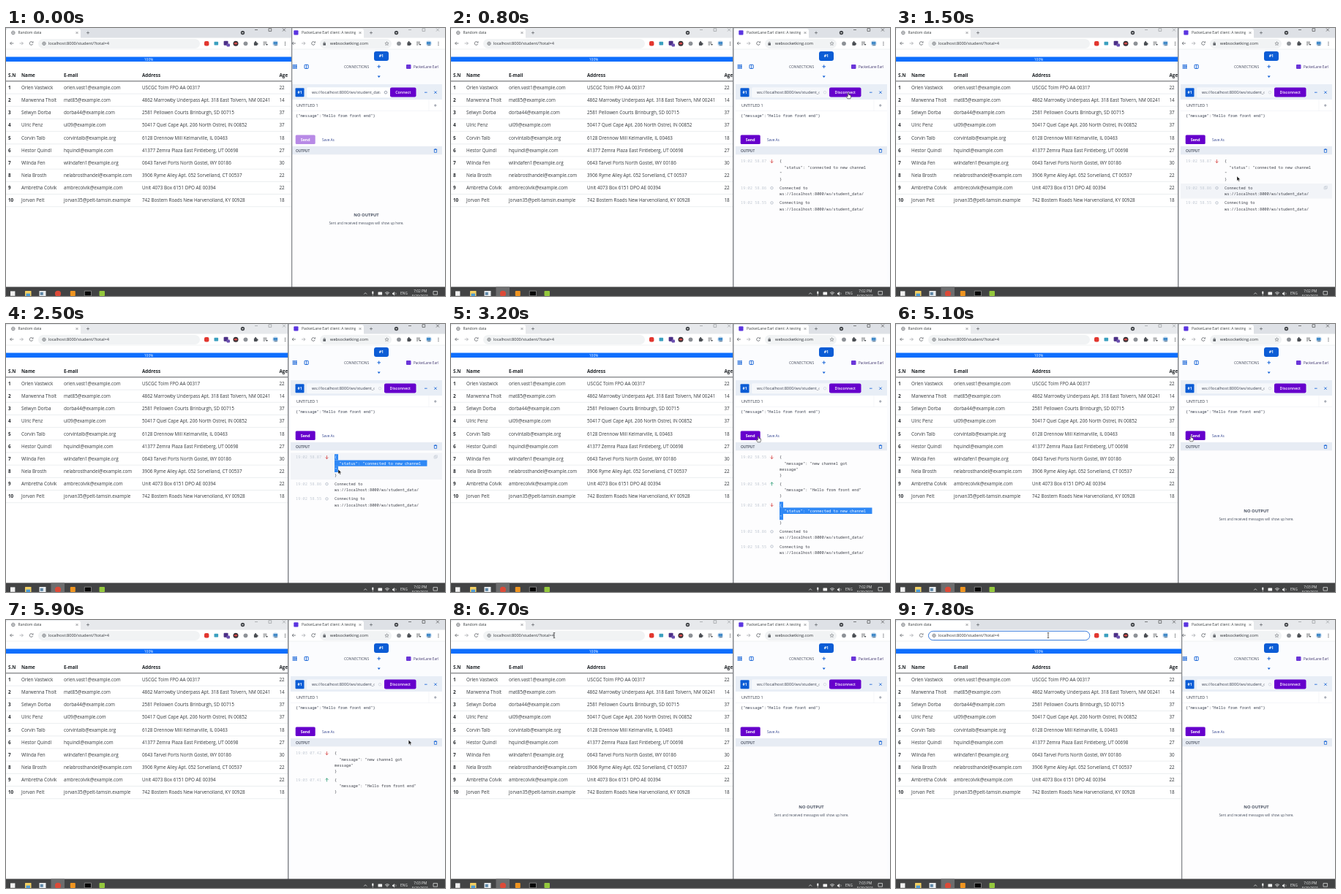
Recreate the animation shown at these times as an HTML page with a canvas. Size 600 by 367 pixels, loop 8 s.

```html
<!DOCTYPE html>
<html lang="en">
<head>
<meta charset="utf-8">
<title>Random data</title>
<style>
html, body { margin: 0; width: 100%; height: 100%; overflow: hidden; background: #fff; }
canvas { display: block; width: 600px; height: 367px; }
</style>
</head>
<body>
<canvas id="stage"></canvas>
<script>
const W = 600, H = 367, LOOP = 8000, STEP = 100;
const canvas = document.getElementById('stage');
const ratio = window.devicePixelRatio || 1;
canvas.width = W * ratio;
canvas.height = H * ratio;
const c = canvas.getContext('2d');
c.scale(ratio, ratio);

const SANS = '"Open Sans", sans-serif';
const MONO = '"Noto Sans Mono", monospace';
const BLUE = '#0b5cd5', PURPLE = '#6600cc', INK = '#212529', GREY = '#5f6368';

// name | e-mail | address | age
const people = `Orlen Vastwick|orlen.vast1@example.com|USCGC Tolm FPO AA 00317|22
Marwenna Tholt|mat85@example.com|4862 Marrowby Underpass Apt. 318 East Tolvern, NM 00241|14
Selwyn Dorba|dorba44@example.com|2581 Pellowen Courts Brinburgh, SD 00715|37
Ulric Penz|ul09@example.com|50417 Quel Cape Apt. 206 North Ostrel, IN 00852|37
Corvin Talb|corvintalb@example.org|6128 Drennow Mill Kelmarville, IL 00463|18
Hestor Quindl|hquindl@example.com|41377 Zemra Plaza East Fintleberg, UT 00698|27
Wilnda Fen|wilndafen1@example.org|0643 Tarvel Ports North Gostel, WY 00186|30
Nela Brosth|nelabrosthandel@example.com|3906 Ryme Alley Apt. 052 Sorvelland, CT 00537|22
Ambretha Colvik|ambrecolvik@example.com|Unit 4073 Box 6151 DPO AE 00394|22
Jorvan Pelt|jorvan35@pelt-tamsin.example|742 Bostem Roads New Harvenolland, KY 00928|18`
  .split('\n').map(row => row.split('|'));

// Moments of the story, in ms
const FOCUS_RIGHT = 300, CONNECT = 500, CLEAR = [4200, 6200], SENDS = [3200, 3400, 3600, 5400];
const MINUTE = 5000, FOCUS_LEFT = 7000;
const sentTimes = [['58.54', '58.55'], ['58.08', '58.09'], ['59.02', '59.03'], ['07.41', '07.42']];

// time, x, y of the pointer tip
const path = [
  [100, 520, 140], [300, 543, 89], [1000, 543, 89], [1300, 490, 228], [1500, 466, 203],
  [1900, 450, 181], [2500, 454, 199], [2700, 470, 200], [3000, 420, 154], [3600, 420, 154],
  [4000, 587, 167], [4300, 587, 167], [5100, 403, 153], [5500, 403, 153], [6000, 587, 167],
  [6200, 587, 167], [6700, 141, 21], [7200, 141, 21], [7500, 257, 21], [7799, 257, 21], [7800, 208, 21]
];

function pointer(t) {
  const i = path.findIndex(p => p[0] > t);
  if (i < 0) return path[path.length - 1].slice(1);
  if (i === 0) return path[0].slice(1);
  const [t0, x0, y0] = path[i - 1], [t1, x1, y1] = path[i];
  const k = (t - t0) / (t1 - t0);
  return [x0 + (x1 - x0) * k, y0 + (y1 - y0) * k];
}

function box(x, y, w, h, fill, r = 0) {
  c.fillStyle = fill;
  c.beginPath();
  c.roundRect(x, y, w, h, r);
  c.fill();
}

function frame(x, y, w, h, color, lw = 0.6, r = 0) {
  c.strokeStyle = color;
  c.lineWidth = lw;
  c.beginPath();
  c.roundRect(x, y, w, h, r);
  c.stroke();
}

function disc(x, y, r, fill) {
  c.fillStyle = fill;
  c.beginPath();
  c.arc(x, y, r, 0, 7);
  c.fill();
}

function ring(x, y, r, color, lw = 0.6, from = 0, to = 2 * Math.PI) {
  c.strokeStyle = color;
  c.lineWidth = lw;
  c.beginPath();
  c.arc(x, y, r, from, to);
  c.stroke();
}

function trace(pts) {
  c.beginPath();
  for (let i = 0; i < pts.length; i += 2) c.lineTo(pts[i], pts[i + 1]);
}

function line(color, lw, ...pts) {
  c.strokeStyle = color;
  c.lineWidth = lw;
  trace(pts);
  c.stroke();
}

function poly(fill, ...pts) {
  c.fillStyle = fill;
  trace(pts);
  c.fill();
}

// y is the middle of the capital letters
function text(s, x, y, size, color = INK, { bold = 400, align = 'left', font = SANS } = {}) {
  c.font = `${bold} ${size}px ${font}`;
  c.textAlign = align;
  c.fillStyle = color;
  c.fillText(s, x, y + size * 0.36);
}

function clipped(x, y, w, h, draw) {
  c.save();
  c.beginPath();
  c.rect(x, y, w, h);
  c.clip();
  draw();
  c.restore();
}

function cross(x, y, r, color, lw = 0.6) {
  line(color, lw, x - r, y - r, x + r, y + r);
  line(color, lw, x + r, y - r, x - r, y + r);
}

function plus(x, y, r, color, lw = 0.7) {
  line(color, lw, x - r, y, x + r, y);
  line(color, lw, x, y - r, x, y + r);
}

function arrow(x, y, dx, dy, r, color, lw = 0.8) {
  line(color, lw, x - dx * r, y - dy * r, x + dx * r, y + dy * r);
  const tx = x + dx * r, ty = y + dy * r, h = r * 0.9;
  line(color, lw, tx - dx * h + dy * h, ty - dy * h + dx * h, tx, ty,
    tx - dx * h - dy * h, ty - dy * h - dx * h);
}

function globe(x, y, r, color) {
  ring(x, y, r, color, 0.7);
  line(color, 0.5, x - r, y, x + r, y);
  line(color, 0.5, x, y - r, x, y + r);
}

function chromeFrame(x, w, tabEnd, title, active) {
  const shade = active ? '#333' : '#8a8d91', end = x + w;
  box(x, 0, w, 14, active ? '#dee1e6' : '#e7e9ec');
  box(x, 1, tabEnd - x, 13, '#fff', [3, 3, 0, 0]);
  clipped(x, 0, tabEnd - x - 11, 14, () => text(title, x + (x ? 18.5 : 16.5), 6.6, 5.1, '#3c4043'));
  cross(tabEnd - 5, 6.5, 1.5, GREY);
  plus(tabEnd + 10, 6.5, 2, GREY);
  disc(end - 66.5, 6.5, 2.7, '#45484c');
  poly('#fff', end - 67.8, 5.9, end - 65.2, 5.9, end - 66.5, 7.6);
  line(shade, 0.6, end - 50, 2.5, end - 46, 2.5);
  frame(end - 31, 0.7, 3.7, 3.7, shade);
  cross(end - 10, 2.5, 2, shade);
  box(x, 13.5, w, 15.5, '#fff');
  line('#e2e4e7', 0.5, x, 29, end, 29);
}

function navButtons(x) {
  arrow(x, 21, -1, 0, 2.4, GREY);
  arrow(x + 13, 21, 1, 0, 2.4, '#a5a8ac');
  ring(x + 26.5, 21, 2.3, GREY, 0.8, 0.3, 5.4);
  poly(GREY, x + 27.2, 20.2, x + 29.4, 20.2, x + 29.4, 18);
}

function menuIcons(x) {
  disc(x, 21.3, 2.9, '#8d9196');
  box(x + 11.4, 19.6, 4.6, 4.4, '#4b4f54', 0.8);
  disc(x + 13.6, 19.2, 1.1, '#4b4f54');
  disc(x + 16.2, 21.8, 1, '#4b4f54');
  for (let i = 0; i < 3; i++) line('#44484c', 0.7, x + 24, 19.2 + i * 1.9, x + (i < 2 ? 29 : 26.5), 19.2 + i * 1.9);
  poly('#44484c', x + 27.5, 22, x + 30.5, 22, x + 29, 24);
  disc(x + 40.7, 21.3, 4.2, '#dbe8f5');
  box(x + 38, 18.8, 5.5, 3.8, '#4189c7');
  box(x + 39.2, 23, 4, 1, '#6a7f92');
  for (let i = -1; i < 2; i++) disc(x + 54, 21.3 + i * 2, 0.65, '#44484c');
}

function leftWindow(t, active) {
  box(0, 0, 390, 355, '#fff');
  chromeFrame(0, 390, 102, 'Random data', active);
  globe(9.8, 6.5, 2.3, GREY);
  navButtons(8);
  const typing = t >= FOCUS_LEFT;
  box(44, 15, 221, 13, typing ? '#fff' : '#f1f3f4', 6.5);
  if (typing) frame(44.4, 15.3, 220.4, 12.3, '#3b7ddd', 1, 6.2);
  globe(52, 21.3, 2.2, GREY);
  text('localhost:8000/student/?total=4', 57.8, 21.2, 5.65, '#303338');
  if (typing && t < 7800) line('#222', 0.6, 141.4, 18, 141.4, 24.5);
  box(271, 18, 6.4, 6.6, '#e2372f', 2);
  box(284.5, 18.8, 5.6, 4.8, '#3aa0bf', 0.8);
  box(297.6, 17.8, 6, 6, '#4b2f86', 1);
  box(301.5, 21.4, 4.5, 4, '#6b4fb0', 0.8);
  disc(314, 21.3, 3.5, '#3a3034');
  box(312, 20, 4, 2.4, '#d44b4b');
  menuIcons(327.5);

  box(0, 39.5, 390, 6.6, '#0d6efd');
  text('100%', 195, 42.8, 4.9, '#fff', { align: 'center' });
  const cols = [3, 21, 79, 186, 373.5];
  ['S.N', 'Name', 'E-mail', 'Address', 'Age'].forEach((s, i) => text(s, cols[i], 64.4, 6.3, INK, { bold: 700 }));
  line('#33373b', 0.8, 0, 72.8, 390, 72.8);
  people.forEach((row, i) => {
    const y = 81.6 + i * 17.18;
    text(String(i + 1), cols[0], y, 6.3, INK, { bold: 700 });
    row.forEach((s, k) => text(s, cols[k + 1], y, 6.3, '#33373b'));
    line('#dee2e6', 0.6, 0, y + 8.5, 390, y + 8.5);
  });
}

function entry(kind, time) {
  const hello = ['{', '  "message": "Hello from front end"', '}'];
  const got = ['{', '  "message": "new channel got', 'message"', '}'];
  const status = ['{', '  "status": "connected to new channel', '"', '}'];
  const url = 'ws://localhost:8000/ws/student_data/';
  const lines = { hello, got, status, open: ['Connected to', url], start: ['Connecting to', url] }[kind];
  return { kind, time, lines, h: lines.length * 8.2 + 3.9 };
}

// Newest entry first
function log(t) {
  const since = Math.max(0, ...CLEAR.filter(x => x <= t));
  const list = [];
  if (!since && t >= CONNECT) list.push(entry('start', '19:02 58.55'));
  if (!since && t >= CONNECT + 100) list.unshift(entry('open', '19:02 58.86'));
  if (!since && t >= CONNECT + 200) list.unshift(entry('status', '19:02 58.87'));
  SENDS.forEach((s, i) => {
    if (s > t || s < since) return;
    const minute = s < MINUTE ? '19:02 ' : '19:03 ';
    list.unshift(entry('got', minute + sentTimes[i][1]), entry('hello', minute + sentTimes[i][0]));
  });
  return list;
}

function drawEntry(e, y, t, hover) {
  if (hover) {
    box(389, y, 207, e.h, '#f2f4f8');
    frame(585, y + 4.5, 3.2, 3.2, '#b9c1cd', 0.5);
    frame(586.2, y + 3.4, 3.2, 3.2, '#b9c1cd', 0.5);
  }
  const mid = y + 6, mono = { font: MONO };
  text(e.time, 396, mid, 5.33, '#c3cad4', mono);
  if (e.kind === 'hello') arrow(438.5, mid, 0, -1, 2.3, '#2f9e78');
  else if (e.kind === 'got' || e.kind === 'status') arrow(438.5, mid, 0, 1, 2.3, '#d64545');
  else ring(438.5, mid, 1.7, '#b4bcc8', 0.9);
  const picked = e.kind === 'status' ? Math.max(0, Math.min(3, Math.floor((t - 1800) / 200))) : 0;
  e.lines.forEach((s, i) => {
    const ly = mid + i * 8.2, on = i < picked;
    if (on) box(449, ly - 4.2, i === 1 ? 126.5 : 5, 8.4, '#2f88f5');
    text(s, 449, ly, 5.33, on ? '#fff' : '#3f424b', mono);
  });
}

function output(t) {
  box(389, 173.5, 207, 178, '#fdfdfe');
  const list = log(t);
  if (!list.length) {
    text('NO OUTPUT', 492.5, 256, 5.75, '#4a5262', { bold: 700, align: 'center' });
    text('Sent and received messages will show up here.', 492.5, 267, 4.7, '#4a5262', { align: 'center' });
    return;
  }
  const [px, py] = pointer(t - STEP);
  clipped(389, 173.5, 207, 178, () => {
    let y = 176.4;
    for (const e of list) {
      drawEntry(e, y, t, px > 389 && py >= y && py < y + e.h);
      y += e.h;
    }
    const total = y - 173.5;
    if (total < 178) return;
    box(590, 173.5, 6, 178, '#f1f1f1');
    box(590.5, 180, 5, 165 * 178 / total, '#c1c1c1');
    poly('#606060', 591.5, 178, 594.5, 178, 593, 176);
    poly('#606060', 591.5, 347, 594.5, 347, 593, 349);
  });
}

function trash(x, y) {
  line(BLUE, 0.7, x - 2.2, y - 1.7, x + 2.2, y - 1.7);
  line(BLUE, 0.6, x - 0.8, y - 2.4, x + 0.8, y - 2.4);
  frame(x - 1.6, y - 1.6, 3.2, 4, BLUE, 0.7);
}

function rightWindow(t, active) {
  const live = t >= CONNECT;
  box(385.5, 0, 214.5, 355, '#fbfcfe');
  chromeFrame(385.5, 214.5, 489, 'PacketLane Earl client: A testing tool', active);
  box(393.3, 3.3, 6.2, 6.2, '#5b35e0', 1);
  navButtons(393.5);
  box(429, 15, 98, 13, '#f1f3f4', 6.5);
  box(433.4, 20.6, 3.6, 3.2, GREY, 0.5);
  ring(435.2, 20.4, 1.2, GREY, 0.6, Math.PI, 2 * Math.PI);
  text('websocketking.com', 443, 21.2, 5.7, '#303338');
  const star = [];
  for (let i = 0; i <= 10; i++) {
    const a = i * Math.PI / 5 - Math.PI / 2, r = i % 2 ? 1.2 : 2.7;
    star.push(520.5 + r * Math.cos(a), 21.4 + r * Math.sin(a));
  }
  line(GREY, 0.5, ...star);
  menuIcons(537);

  box(503, 32, 20, 13, BLUE, 3);
  text('#1', 512.9, 38.4, 5.2, '#fff', { bold: 700, align: 'center' });
  for (let i = 0; i < 9; i++) box(391.8 + i % 3 * 2.1, 50 + Math.floor(i / 3) * 2.1, 1.6, 1.6, BLUE);
  frame(408, 50.3, 5.2, 5.2, BLUE, 0.9, 0.6);
  line(BLUE, 0.8, 410.6, 50.3, 410.6, 55.5);
  text('CONNECTIONS', 462, 53, 4.9, '#454c5c');
  plus(509.7, 52.8, 2.3, BLUE, 0.9);
  poly(BLUE, 507.7, 65.5, 511.7, 65.5, 509.7, 68);
  box(547, 50, 6.5, 6, '#6a35d8', 1);
  text('PacketLane Earl', 557, 53, 4.65, '#41366f');

  box(389, 77, 207, 21, '#e8eef6');
  box(395.5, 82.3, 12, 12, BLUE, 1);
  text('#1', 401.5, 88.2, 4.8, '#fff', { bold: 700, align: 'center' });
  const edge = live ? 517 : 525;
  box(411, 81.3, edge - 408, 14, live ? '#f6f8fb' : '#fff', 2);
  clipped(411, 80, edge - 13.5 - 411, 16, () =>
    text('ws://localhost:8000/ws/student_data/', 418, 88.2, 5.62, '#3b4252'));
  ring(edge - 6, 88.2, 1.8, live ? '#d5dae2' : '#8f98a8', 0.9);
  box(edge, 81.6, 560.5 - edge, 13, PURPLE, 2);
  text(live ? 'Disconnect' : 'Connect', (edge + 560.5) / 2, 88.1, 5.3, '#fff', { bold: 600, align: 'center' });
  line(BLUE, 0.8, 572, 88.2, 575.6, 88.2);
  cross(587, 88.2, 1.7, BLUE, 0.8);

  box(389, 98, 207, 64, '#fff');
  text('UNTITLED 1', 397, 106, 5.4, '#2f3644', { bold: 500 });
  plus(586.8, 106, 1.8, '#6d7686', 0.7);
  line('#eaedf3', 0.5, 389, 113.5, 596, 113.5);
  line('#eaedf3', 0.5, 578, 98, 578, 113.5);
  text('{"message":"Hello from front end"}', 396, 119.7, 5.33, '#3b4252', { font: MONO });
  box(395.7, 146.5, 27, 12.4, live ? PURPLE : '#b88ae6', 1.5);
  text('Send', 409.2, 152.7, 5.3, '#fff', { bold: 700, align: 'center' });
  text('Save As', 432, 153, 4.75, '#31438f');

  box(389, 162, 207, 11.5, '#e7ecf4');
  text('OUTPUT', 396, 168, 4.75, '#3b4252', { bold: 600 });
  trash(587, 168);
  output(t);
}

function taskbar(t) {
  box(0, 354.5, W, 12.5, '#424344');
  if (t >= 100) box(61.5, 354.5, 18.5, 12.5, '#6c6d6e');
  box(6, 360.4, 6.4, 6.4, '#f2f2f2');
  box(26, 360, 8.5, 7, '#f3cf62', 0.6);
  box(27.5, 363.6, 5.5, 3.4, '#4a9bd6');
  box(45.5, 360, 9, 7, '#e8ecef');
  box(46.8, 361.8, 4, 4, '#5d87a8');
  disc(71, 363.8, 4.1, '#dc4a38');
  box(87.8, 360, 7, 7, '#ef9420', 1);
  box(107.3, 360.2, 9.2, 6.6, '#070707');
  frame(107.3, 360.2, 9.2, 6.6, '#b6b6b6', 0.6);
  box(127.5, 360, 7.5, 7, '#94c83d', 1);

  const pale = '#f3f4f4';
  line(pale, 0.7, 489.2, 364.6, 491.2, 362.6, 493.2, 364.6);
  box(500.3, 360.6, 2, 4, pale, 1);
  line(pale, 0.6, 501.3, 364.6, 501.3, 366.5);
  box(508.5, 361.6, 5.6, 4, pale, 0.5);
  for (let r = 1.3; r < 5; r += 1.5) ring(521, 366, r, pale, 0.7, -2.36, -0.78);
  poly(pale, 528, 362.7, 529.3, 362.7, 531, 361, 531, 366.4, 529.3, 364.8, 528, 364.8);
  ring(531, 363.7, 2, pale, 0.5, -0.9, 0.9);
  text('ENG', 544, 363.6, 4.8, pale, { align: 'center' });
  text(t < MINUTE ? '7:02 PM' : '7:03 PM', 566.3, 360, 4.8, pale, { align: 'center' });
  text('9/20/2021', 566, 367, 4.8, pale, { align: 'center' });
  frame(584, 360.6, 5.6, 4.6, pale, 0.7);
}

function inside(x, y, x0, y0, x1, y1) {
  return x >= x0 && x <= x1 && y >= y0 && y <= y1;
}

function drawPointer(t) {
  if (t < 100) return;
  const [x, y] = pointer(t);
  c.save();
  c.translate(x, y);
  if (inside(x, y, 44, 15, 265, 28)) {
    line('#222', 0.7, 0, -3.4, 0, 3.4);
    line('#222', 0.6, -1.3, -3.5, 1.3, -3.5);
    line('#222', 0.6, -1.3, 3.5, 1.3, 3.5);
  } else if (inside(x, y, 517, 82, 560, 95) || inside(x, y, 396, 147, 422, 159) || inside(x, y, 584, 164, 590, 172)) {
    const hand = [-0.7, 0, 0.6, 0, 0.7, 2.6, 3.4, 3.2, 3.6, 5.4, 2.8, 7.8, -1, 7.8, -3, 4.8, -2.3, 4.2, -0.8, 5.2, -0.7, 0];
    poly('#fff', ...hand);
    line('#222', 0.6, ...hand);
  } else {
    const tip = [0, 0, 0, 6.3, 1.5, 5, 2.5, 7.2, 3.5, 6.7, 2.5, 4.6, 4.5, 4.5, 0, 0];
    poly('#111', ...tip);
    line('#fff', 0.4, ...tip);
  }
  c.restore();
}

function render(t) {
  c.clearRect(0, 0, W, H);
  if (t < FOCUS_RIGHT || t >= FOCUS_LEFT) {
    rightWindow(t, false);
    leftWindow(t, true);
    line('#85888c', 1.3, 390.6, 0, 390.6, 355);
  } else {
    leftWindow(t, false);
    rightWindow(t, true);
    line('#85888c', 1.5, 385.7, 0, 385.7, 355);
  }
  taskbar(t);
  drawPointer(t);
}

const begin = performance.now();
function tick() {
  const t = (performance.now() - begin) % LOOP;
  render(Math.floor(t / STEP) * STEP);
  requestAnimationFrame(tick);
}
tick();
</script>
</body>
</html>
```
